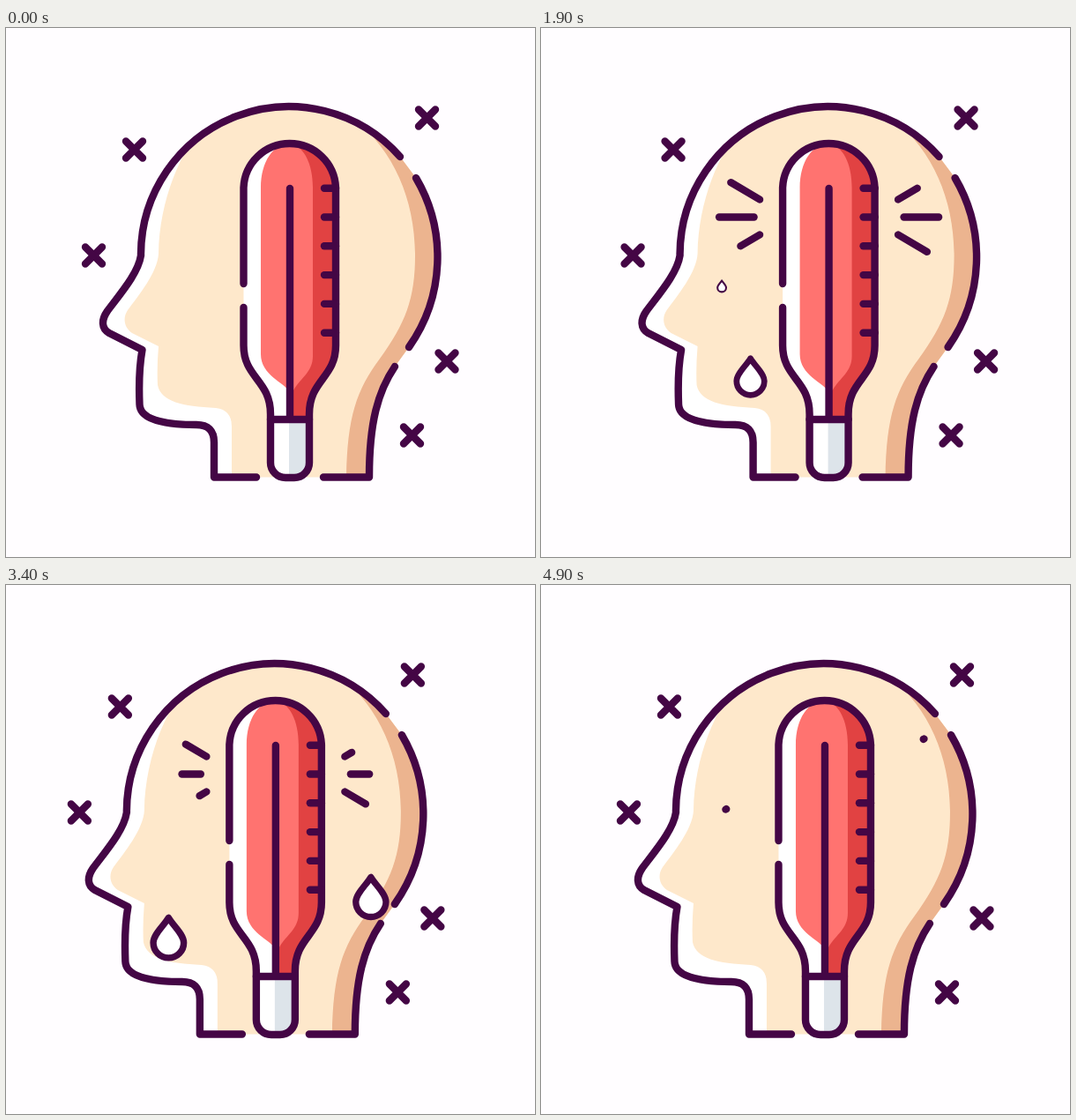
Animation, 600 px wide and 600 px high, one loop 5 s. Source, as an HTML page:

```html
<!DOCTYPE html>
<html lang="en">
<head>
<meta charset="utf-8">
<title>Headache</title>
<style>
  html, body { margin: 0; width: 100%; height: 100%; overflow: hidden; background: #fffdff; }
  svg { display: block; width: 100vw; height: 100vh; }
  .ink { fill: none; stroke: #440645; stroke-width: 8.4; stroke-linecap: round; stroke-linejoin: round; }
  .drop { fill: #fff; stroke-width: 7.4; }
</style>
</head>
<body>
<svg viewBox="0 0 600 600">
  <defs>
    <clipPath id="inSkull"><path id="skullArea"/></clipPath>
    <clipPath id="inTube"><use href="#tube"/></clipPath>
  </defs>
  <g id="scene">
    <g id="head">
      <g clip-path="url(#inSkull)">
        <rect x="90" y="70" width="430" height="440" fill="#fff"/>
        <path fill="#fee8cb" d="M240 92C202 128 174 190 173 256C172 277 150 304 138 320C132 329 134 340 143 346L173 361Q171 385 172 405C176 424 200 429 238 431Q256 433 256 452V510H520V60Z"/>
        <path fill="#ecb48f" d="M396 104C440 140 464 195 464 258C464 307 453 335 424 375C398 410 387 440 386 510H520V80Z"/>
      </g>
      <path id="skull" class="ink" d="M284 509.500H236V470Q236 450 216 450C190 450 152 447 151.500 427Q150 390 154.500 365L117 346C108 341 108 331 115 321C130 301 150 278 153 258A168 168 0 0 1 447 146M465 170A177 177 0 0 1 457 362M441 384C422 412 412 447 412 509.500H360"/>
    </g>
    <g id="meter">
      <g clip-path="url(#inTube)">
        <rect x="260" y="120" width="125" height="395" fill="#fff"/>
        <path fill="#e14242" d="M322 129H380V444H322Z"/>
        <path fill="#ff7370" d="M289 181C289 152 303 131 322 131C338 134 348 154 348 181V372C348 390 335 396 326 411L322 413C316 402 289 394 289 370Z"/>
        <path fill="#dde4ea" d="M321 444H346V512H321Z"/>
      </g>
      <path id="tube" class="ink" d="M269.500 290V181A52.300 52.300 0 0 1 374 181V360C374 397 344 399 344 438V493A17 17 0 0 1 327 510H317A17 17 0 0 1 300 493V438C300 399 269.500 397 269.500 360V317"/>
      <path class="ink" d="M300 444H344M322 182V442"/>
    </g>
  </g>
</svg>
<script>
const LOOP = 5000, FRAME = 100;
const get = id => document.getElementById(id);
const scene = get('scene'), head = get('head'), meter = get('meter');

function add(parent, d, cls = 'ink') {
  const el = document.createElementNS('http://www.w3.org/2000/svg', 'path');
  el.setAttribute('class', cls);
  el.setAttribute('d', d);
  parent.append(el);
  return el;
}

const move = (el, value) => el.setAttribute('transform', value);
const show = (el, on) => { el.style.display = on ? '' : 'none'; };
const clamp = v => Math.min(1, Math.max(0, v));

// cubic-bezier(.42, 0, .58, 1), solved by bisection
function ease(v) {
  const x = clamp(v);
  let lo = 0, hi = 1, s = x;
  for (let i = 0; i < 20; i++) {
    s = (lo + hi) / 2;
    const r = 1 - s;
    if (1.26 * r * r * s + 1.74 * r * s * s + s * s * s < x) lo = s; else hi = s;
  }
  return s * s * (3 - 2 * s);
}

const phase = (t, start, length) => ease((t - start) / length);

// right, across to the left, back to the middle
const sway = t => 48 * (phase(t, 1680, 1020) - 2 * phase(t, 2800, 1000) + phase(t, 3900, 1020));

// swell, shrink, settle
const pulse = t => 1 + 0.068 * phase(t, 0, 400) - 0.118 * phase(t, 400, 400) + 0.05 * phase(t, 800, 400);

// the filled skull bridges the gaps of its outline
get('skullArea').setAttribute('d', 'M' + get('skull').getAttribute('d').slice(1).replace(/M/g, 'L') + 'Z');

for (let i = 0; i < 6; i++) add(meter, `M361 ${181.7 + 32.8 * i}H374`);

const crosses = [[99.5, 258], [145.5, 138], [477.5, 102], [500, 378], [460.5, 462]]
  .map(([x, y], i) => ({ x, y, start: 20 + 50 * i, el: add(scene, 'M-9.5-9.5L9.5 9.5M9.5-9.5L-9.5 9.5') }));

// three rays fan out on either side of the thermometer
const rays = [];
for (const side of [-1, 1]) {
  for (const row of [-1, 0, 1]) {
    rays.push({
      x: 322 + side * (row ? 78.5 : 85),
      y: 214.5 + row * 20,
      dx: side * (row ? 34 : 47),
      dy: row * 20,
      start: 1035 + 142 * (1 - side * row),
      el: add(scene, '')
    });
  }
}

const DROP = 'M0-22.8C-5-14-17.300-4-17.300 5.500A17.300 17.300 0 0 0 17.300 5.500C17.300-4 5-14 0-22.800Z';
const drops = [[233, 332], [200.5, 282], [430, 257]]
  .map(([x, y], i) => ({ x, y, start: 1320 + 500 * i, el: add(scene, DROP, 'ink drop') }));

function zoom(el, x, k) {
  move(el, `translate(${x} 510) scale(${k}) translate(${-x} -510)`);
}

function drawCross({ x, y, start, el }, t) {
  const lift = 25 * Math.sin(Math.PI * clamp((t - start) / 1000)) ** 2;
  move(el, `translate(${x} ${y - lift})`);
}

function drawRay({ x, y, dx, dy, start, el }, t) {
  const cycle = 1750;
  const age = t - start - (t < start + cycle ? 0 : cycle);
  const tip = phase(age, 0, 1000), tail = phase(age, 935, 1000);
  const at = k => `${x + dx * k} ${y + dy * k}`;
  show(el, tip > 0.01 && tail < 0.995);
  el.setAttribute('d', `M${at(tail)}L${at(tip)}`);
}

function drawDrop({ x, y, start, el }, t) {
  const age = t - start;
  show(el, age > 0 && age < 2000);
  const size = (1 - Math.exp(-age / 240)) * (1 - phase(age, 1650, 350));
  const fall = 155 * (1 - Math.exp(-age / 1100));
  move(el, `translate(${x} ${y + fall}) scale(${size})`);
}

function draw(t) {
  move(scene, `translate(${sway(t)} 0)`);
  zoom(head, 300, pulse(t));
  zoom(meter, 322, pulse(t - 200));
  crosses.forEach(c => drawCross(c, t));
  rays.forEach(r => drawRay(r, t));
  drops.forEach(d => drawDrop(d, t));
}

function tick() {
  const step = Math.floor((performance.now() + 4) / FRAME);
  draw(step * FRAME % LOOP);
  requestAnimationFrame(tick);
}
tick();
</script>
</body>
</html>
```
